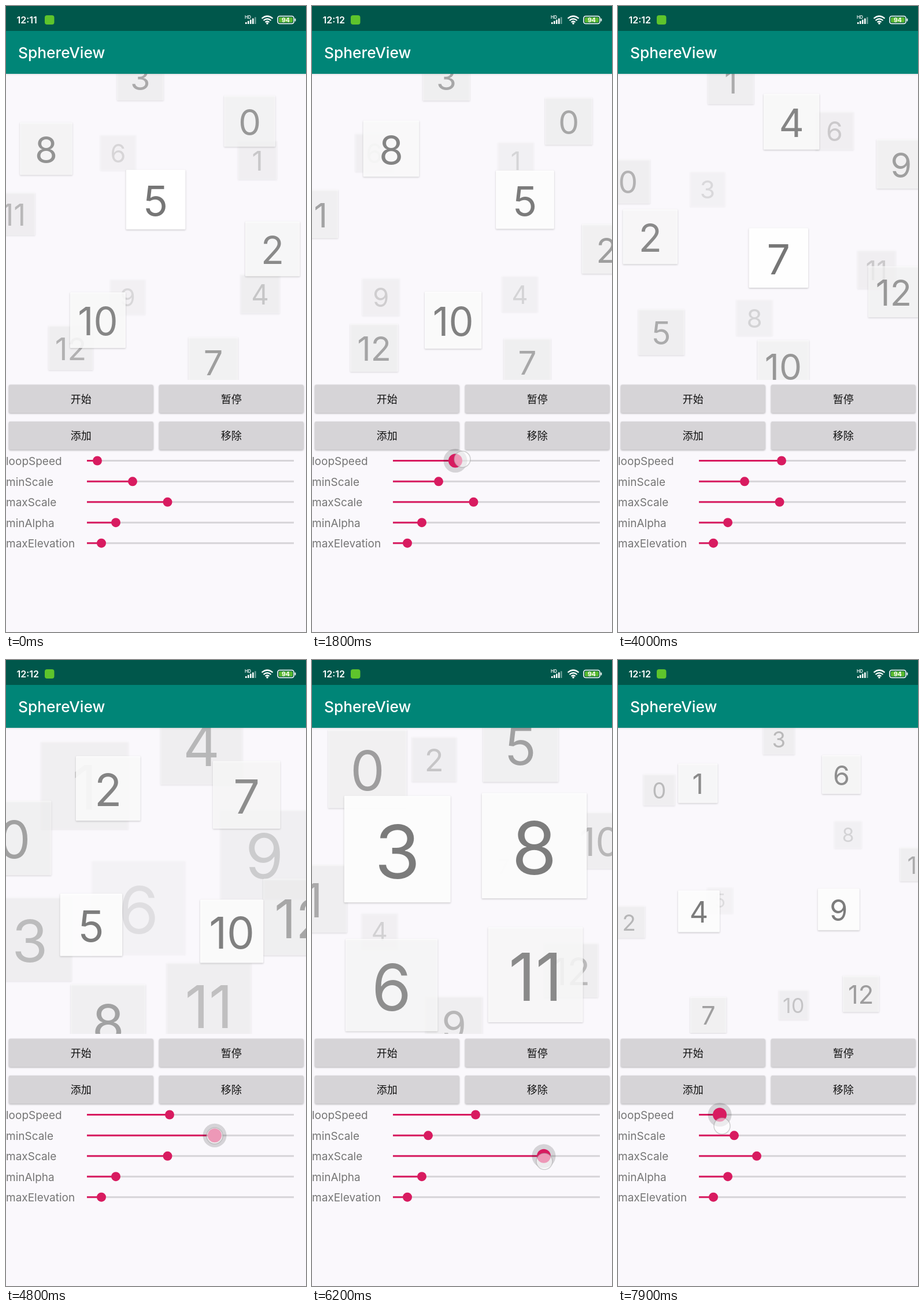
These frames come from a looping animation (519 px wide and 1080 px high, 8000 ms). An HTML page:

```html
<!DOCTYPE html>
<html lang="en">
<head>
<meta charset="utf-8">
<title>SphereView</title>
<style>
  html, body { margin: 0; width: 100%; height: 100%; overflow: hidden; background: #faf8fc; }
  svg { display: block; width: 100vw; height: 100vh; font-family: Inter, "Noto Sans CJK SC", "Noto Sans CJK", sans-serif; }
</style>
</head>
<body>
<svg id="app" viewBox="0 0 519 1080">
  <defs>
    <clipPath id="clip"><rect y="117" width="519" height="528"/></clipPath>
    <filter id="soft"><feGaussianBlur stdDeviation="1.5"/></filter>
    <linearGradient id="drop" x2="0" y2="1">
      <stop offset="0" stop-opacity=".14"/><stop offset="1" stop-opacity="0"/>
    </linearGradient>
  </defs>
  <rect width="519" height="1080" fill="#faf8fc"/>
  <g id="sphere" clip-path="url(#clip)"></g>
  <rect y="116" width="519" height="4" fill="url(#drop)"/>
  <rect y="42" width="519" height="75" fill="#008577"/>
  <rect width="519" height="43" fill="#00574b"/>
  <g fill="#fff">
    <text id="clock" x="18.5" y="30" font-size="16" font-weight="600"></text>
    <rect x="67" y="16" width="16.500" height="16" rx="4" fill="#5ec42c"/>
    <text x="413" y="21.5" font-size="7.5" font-weight="600">HD</text>
    <g id="bars"></g>
    <g fill="none" stroke="#fff" stroke-width="2.2">
      <path d="M442.5 21.5Q452 13.5 461.5 21.5M445.5 25Q452 19.5 458.5 25M448.5 28Q452 25 455.5 28"/>
    </g>
    <circle cx="452" cy="30" r="1.8"/>
    <rect x="470" y="17.5" width="28" height="13" rx="3.5" fill="none" stroke="#fff" stroke-width="1.6"/>
    <rect x="472" y="19.5" width="24" height="9" rx="1.5" fill="#58b82e"/>
    <rect x="499.5" y="21.5" width="1.8" height="5" rx=".8"/>
    <text x="484" y="27.8" font-size="10.5" font-weight="700" text-anchor="middle">94</text>
    <text x="21" y="90" font-size="26.3" font-weight="500">SphereView</text>
  </g>
  <g id="buttons"></g>
  <g id="sliders"></g>
  <circle id="touch" r="14" fill="#fff" fill-opacity=".55" stroke="#999" stroke-opacity=".45" stroke-width="1.5"/>
</svg>
<script>
const LOOP = 8000, STEP = 100, R = 259.5, CX = 259.5, CY = 380.5;
const RAD = Math.PI / 180;
const SPIN = 0.553;            // degrees per second for each slider pixel
const TURN = 3320;             // the swipe that tilts the spin axis
const AX = 0.825, AY = 0.565;  // tilted axis
const TRACK = 140;

// height and longitude of each card on the sphere
const cards = [
  [-182, 61.2], [-115, 131], [38.5, 51.8], [-258, -102], [116, 129.1],
  [-46.5, -0.1], [-128, 196.9], [233.5, 61], [-134.5, -58.9], [121, 192.3],
  [161.5, -29.7], [-22, 252.2], [209, 253.5]
];

const sliders = [
  { name: 'loopSpeed', y: 784.5, keys: [[0, 18], [1500, 18], [1800, 108], [2300, 273], [2800, 197], [2950, 143], [7540, 143], [7640, 36]] },
  { name: 'minScale', y: 820.3, keys: [[4300, 79], [4800, 221], [5350, 61]] },
  { name: 'maxScale', y: 855.8, keys: [[5600, 139.5], [6200, 261], [7200, 100]] },
  { name: 'minAlpha', y: 891.2, keys: [[0, 50]] },
  { name: 'maxElevation', y: 926.7, keys: [[0, 25]] }
];

// finger paths: slider index, then time, x, y
const drags = [
  { slider: 0, path: [[1450, 168, 786], [1800, 260, 782], [2300, 418, 790], [2800, 323, 801], [2970, 283, 800]] },
  { slider: 1, path: [[4300, 219, 822], [4800, 361, 821], [5400, 201, 832]] },
  { slider: 2, path: [[5600, 280, 858], [6200, 402, 865], [7250, 240, 874]] },
  { slider: 0, path: [[7540, 270, 800], [7640, 180, 804], [8000, 180, 804]] }
];

const $ = id => document.getElementById(id);

function add(parent, tag, attrs, text) {
  const el = document.createElementNS('http://www.w3.org/2000/svg', tag);
  set(el, attrs);
  if (text !== undefined) el.textContent = text;
  parent.appendChild(el);
  return el;
}

function set(el, attrs) {
  for (const k in attrs) el.setAttribute(k, attrs[k]);
}

function at(keys, t, col = 1) {
  if (t <= keys[0][0]) return keys[0][col];
  for (let i = 1; i < keys.length; i++) {
    const a = keys[i - 1], b = keys[i];
    if (t <= b[0]) return a[col] + (b[col] - a[col]) * (t - a[0]) / (b[0] - a[0]);
  }
  return keys[keys.length - 1][col];
}

// integral of a track from 0 to t, in value-seconds
function area(keys, t) {
  const stops = [...keys.map(k => k[0]).filter(s => s < t), t];
  let sum = 0;
  for (let i = 1; i < stops.length; i++) {
    sum += (at(keys, stops[i]) + at(keys, stops[i - 1])) / 2 * (stops[i] - stops[i - 1]) / 1000;
  }
  return sum;
}

function build() {
  for (let i = 0; i < 5; i++) {
    const h = 3 + i * 2.2;
    add($('bars'), 'rect', { x: 414 + i * 4, y: 31 - h, width: 2.6, height: h, opacity: i < 4 ? 1 : 0.4 });
  }
  ['开始', '暂停', '添加', '移除'].forEach((label, i) => {
    const x = 5 + i % 2 * 260, y = 653.5 + (i >> 1) * 63.5, box = { x, width: 249.5, height: 48.5, rx: 2 };
    add($('buttons'), 'rect', { ...box, y: y + 1, opacity: 0.3, filter: 'url(#soft)' });
    add($('buttons'), 'rect', { ...box, y, fill: '#d6d4d7' });
    add($('buttons'), 'text', { x: x + 124.7, y: y + 31, 'font-size': 18, 'font-weight': 500, 'text-anchor': 'middle', fill: '#111' }, label);
  });
  for (const s of sliders) {
    const g = $('sliders'), line = { x1: TRACK, y1: s.y, y2: s.y, 'stroke-width': 3 };
    add(g, 'text', { x: 0, y: s.y + 7.5, 'font-size': 19, fill: '#757575' }, s.name);
    add(g, 'line', { ...line, x2: 498, stroke: '#d6d4d8' });
    s.bar = add(g, 'line', { ...line, stroke: '#d81b60' });
    s.halo = add(g, 'circle', { cy: s.y, r: 20.5, opacity: 0.15 });
    s.thumb = add(g, 'circle', { cy: s.y, fill: '#d81b60' });
  }
  cards.forEach((c, i) => {
    const g = add($('sphere'), 'g', {});
    c.g = g;
    c.shade = add(g, 'rect', { filter: 'url(#soft)' });
    c.face = add(g, 'rect', { rx: 1.5, fill: '#fff' });
    c.label = add(g, 'text', { 'text-anchor': 'middle', fill: '#757575' }, i);
  });
}

function place(c, yaw, roll) {
  const [y, lon] = c, ring = Math.sqrt(R * R - y * y), a = (lon + yaw) * RAD;
  const x = ring * Math.sin(a), z = ring * Math.cos(a);
  const along = AX * x + AY * y, across = AY * x - AX * y;
  const cos = Math.cos(roll * RAD), sin = Math.sin(roll * RAD);
  const e = across * cos + z * sin;
  return { x: CX + AX * along + AY * e, y: CY + AY * along - AX * e, z: z * cos - across * sin };
}

function drawSphere(t) {
  const speed = sliders[0].keys;
  const yaw = SPIN * area(speed, Math.min(t, TURN));
  const swipe = at([[TURN, 0], [TURN + 300, 38.3]], t);
  const roll = SPIN * area(speed, t) - yaw + swipe;
  const [min, max] = [1, 2].map(i => at(sliders[i].keys, t) * 0.74);
  for (const c of cards) {
    const p = place(c, yaw, roll), near = (p.z / R + 1) / 2;
    const size = min + (max - min) * near, alpha = 0.14 + 0.86 * near;
    const box = { x: p.x - size / 2, width: size, height: size };
    c.z = p.z;
    set(c.shade, { ...box, y: p.y - size / 2 + 1.2, opacity: 0.21 * alpha });
    set(c.face, { ...box, y: p.y - size / 2, opacity: alpha });
    set(c.label, { x: p.x, y: p.y + size * 0.275, 'font-size': size * 0.695, opacity: alpha });
  }
  [...cards].sort((a, b) => a.z - b.z).forEach(c => $('sphere').appendChild(c.g));
}

function drawSliders(t) {
  const drag = drags.find(d => t >= d.path[0][0] && t < d.path[d.path.length - 1][0]);
  sliders.forEach((s, i) => {
    const x = TRACK + at(s.keys, t), held = drag && drag.slider === i;
    set(s.bar, { x2: x });
    set(s.thumb, { cx: x, r: held ? 12 : 8 });
    set(s.halo, { cx: x, visibility: held ? 'visible' : 'hidden' });
  });
  set($('touch'), { visibility: drag ? 'visible' : 'hidden' });
  if (drag) set($('touch'), { cx: at(drag.path, t), cy: at(drag.path, t, 2) });
}

function draw(t) {
  $('clock').textContent = t < 900 ? '12:11' : '12:12';
  drawSphere(t);
  drawSliders(t);
}

build();
draw(0);
const start = performance.now();
(function tick() {
  const t = (performance.now() - start) % LOOP;
  draw(Math.floor(t / STEP) * STEP);
  requestAnimationFrame(tick);
})();
</script>
</body>
</html>
```
